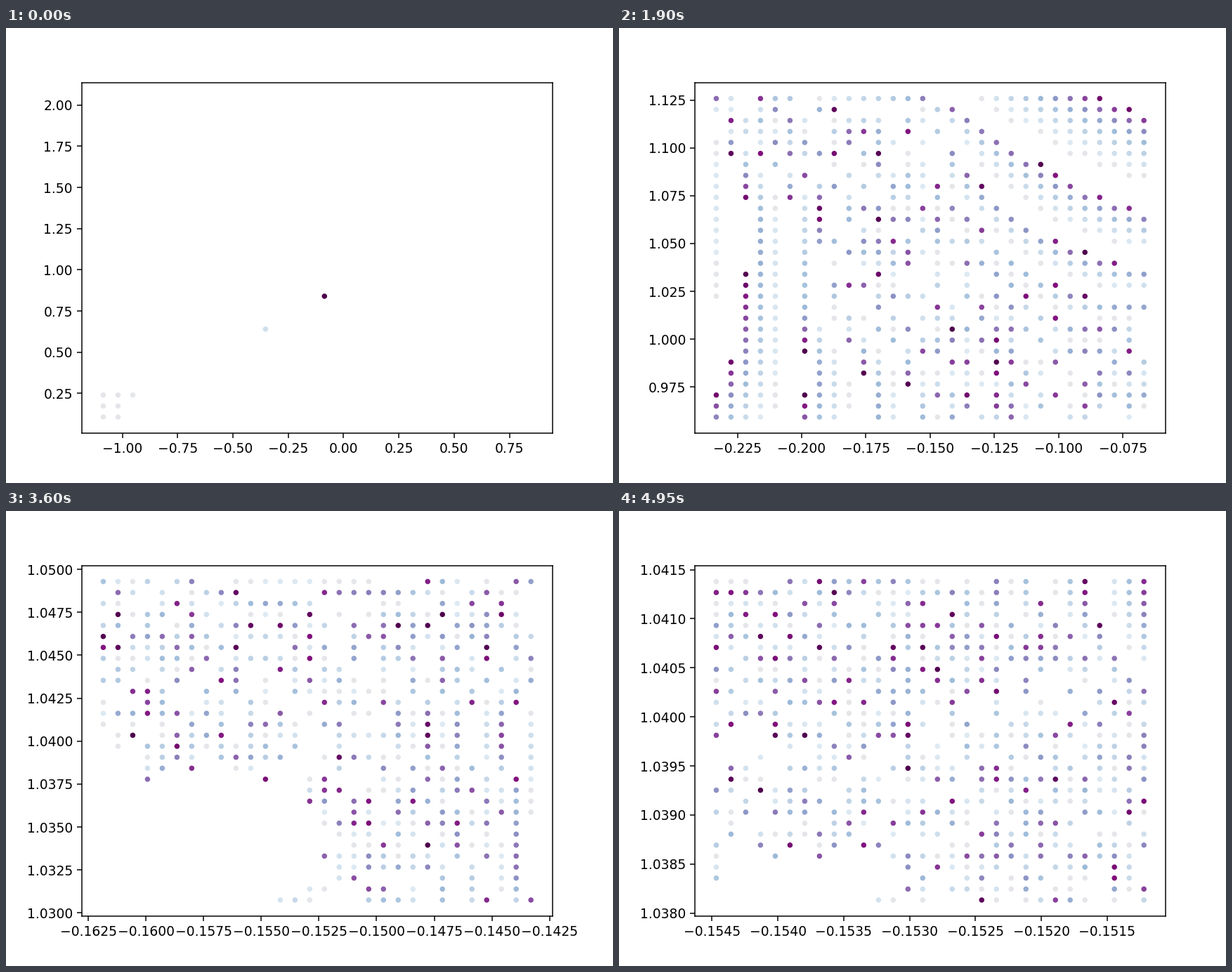
Write a matplotlib script that moves like this. It is 864 by 648 pixels and loops after 5000 ms.

```python
import numpy as np
import matplotlib.pyplot as plt
from matplotlib.animation import FuncAnimation

FRAMES, INTERVAL = 100, 50
CENTER = -0.1529, 1.0397
ZOOM = 15 / 16
CELLS = 30
RADIUS = 20
FAINT, PALE = 0.0972, 0.135  # below FAINT a dot vanishes, below PALE it is grey
GREY = (0.894, 0.902, 0.914, 1)

fig, ax = plt.subplots(figsize=(6.4, 4.8), dpi=135, facecolor="white")
dots = ax.scatter(np.zeros(CELLS**2), np.zeros(CELLS**2), marker=".")
cmap = plt.get_cmap("BuPu")


def axis_points(mid, half):
    return mid - half + np.arange(1, CELLS + 1) * 2 * half / CELLS


def padded(p):
    pad = 0.05 * (p[-1] - p[0])
    return p[0] - pad, p[-1] + pad


def iterate(c, steps):
    """Size of z when it leaves the radius, or after the last step."""
    z = np.zeros_like(c)
    live = np.ones(c.shape, bool)
    for _ in range(steps):
        z[live] = z[live] ** 2 + c[live]
        live &= np.abs(z) <= RADIUS
    return np.abs(z), live


def dot_colors(size, shown):
    low, high = size[shown].min(), size[shown].max()
    level = np.clip((size - low) / (high - low), 0, 1)
    rgba = cmap(level)
    rgba[level < PALE] = GREY
    rgba[(level < FAINT) | ~shown, 3] = 0
    return rgba


def update(i):
    half = ZOOM**i
    xs, ys = (axis_points(m, half) for m in CENTER)
    x, y = (g.ravel() for g in np.meshgrid(xs, ys))
    size, live = iterate(x + 1j * y, 31 + i)

    # the opening view shows only points that have not escaped
    shown = live if i == 0 else np.ones_like(live)
    dots.set_offsets(np.column_stack([x, y]))
    dots.set_color(dot_colors(size, shown))
    ax.set_xlim(padded(xs))
    ax.set_ylim(padded(ys))
    return dots,


anim = FuncAnimation(fig, update, frames=FRAMES, interval=INTERVAL, repeat=True)
plt.show()
```
